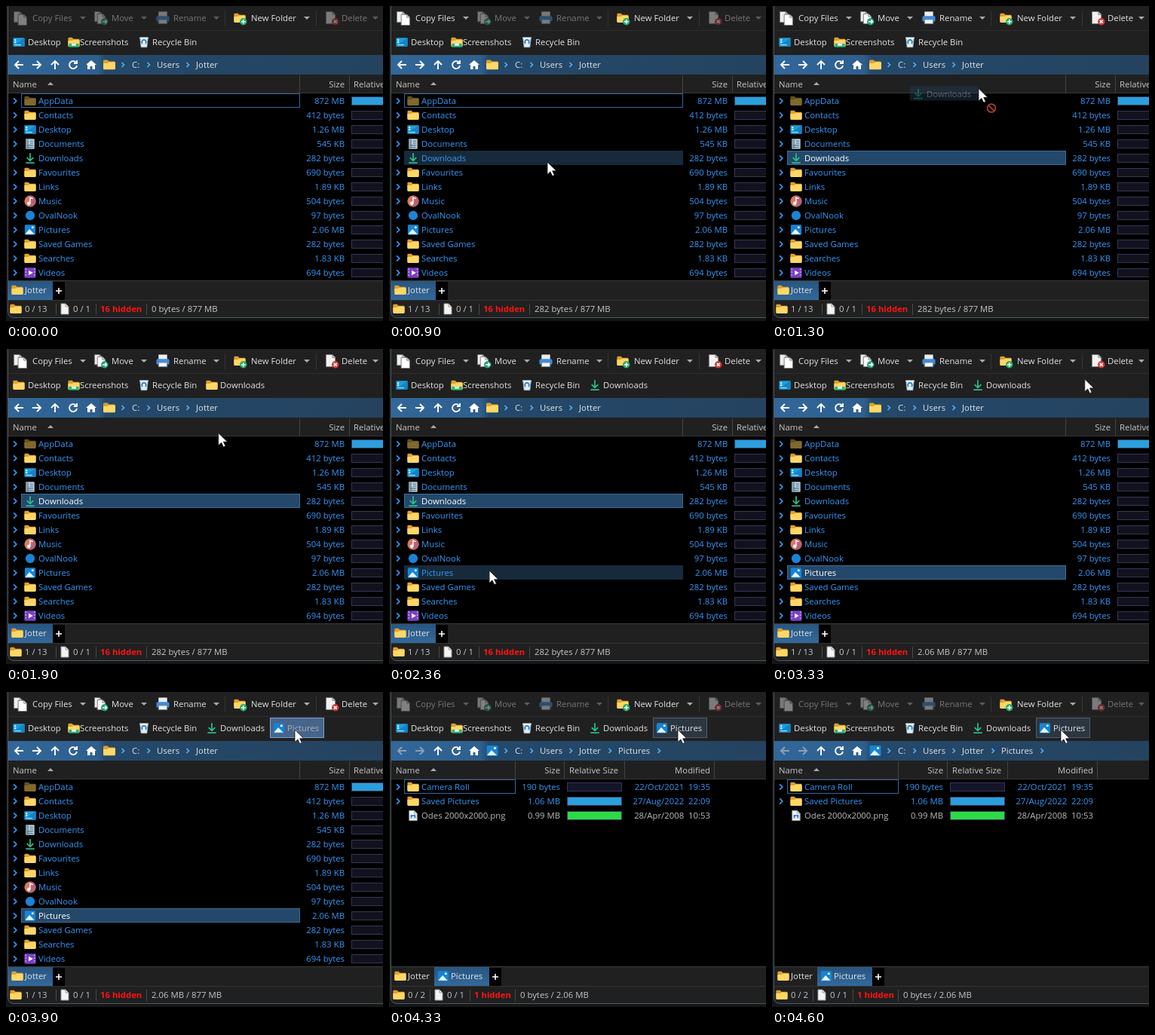
Write an HTML page that moves like this. It is 500 by 418 pixels and loops after 6300 ms.

```html
<!DOCTYPE html>
<html lang="en">
<head>
<meta charset="utf-8">
<title>File manager</title>
<style>
html, body { margin: 0; width: 100%; height: 100%; overflow: hidden; background: #141618; }
svg { display: block; width: 500px; height: 418px; }
text { font: 11.35px "Open Sans", "Noto Sans", sans-serif; white-space: pre; }
</style>
</head>
<body>
<svg id="stage" viewBox="0 0 500 418">
  <g id="scene"></g>
  <g id="ghost"></g>
  <g id="noDrop" fill="none" stroke="#a83c38" stroke-width="1.8"><circle r="5.4"/><path d="M-3.8 -3.8L3.8 3.8"/></g>
  <path id="cursor" d="M0 0V16.5L3.9 12.9L6.7 18.6L9.4 17.4L6.7 11.8H12Z" fill="#fff" stroke="#111" stroke-width=".8"/>
</svg>
<script>
(() => {
const LOOP = 6300, USER = 'Jotter';
const BLUE = '#3797f5', LIGHT = '#e2e2e2', SOFT = '#c6c6c6';
const $ = id => document.getElementById(id);

const at = (x, y, s) => `<g transform="translate(${x} ${y})">${s}</g>`;
const rect = (x, y, w, h, fill, more = '') => `<rect x="${x}" y="${y}" width="${w}" height="${h}" fill="${fill}" ${more}/>`;
const path = (d, fill, more = '') => `<path d="${d}" fill="${fill}" ${more}/>`;
const line = (d, color, w = 1) => path(d, 'none', `stroke="${color}" stroke-width="${w}"`);
const disc = (x, y, r, fill) => `<circle cx="${x}" cy="${y}" r="${r}" fill="${fill}"/>`;
// Text is placed by the middle of its line.
const text = (x, y, s, fill = LIGHT, anchor = 'start', more = '') =>
  `<text x="${x}" y="${y + 4}" fill="${fill}" text-anchor="${anchor}" ${more}>${s}</text>`;
const chevron = (x, y, color = BLUE, r = 3.6) => line(`M${x - r / 2} ${y - r}L${x + r / 2} ${y}L${x - r / 2} ${y + r}`, color, 1.7);
const dropArrow = (x, color) => path(`M${x - 4} 14H${x + 4}L${x} 18Z`, color);
const border = color => `stroke="${color}"`;

// Icons are drawn around their own middle.
const folderShape = (back, front) =>
  path('M-8 -5Q-8 -6.5 -6.5 -6.5H-2.5L-.5 -4.5H6.5Q8 -4.5 8 -3V5H-8Z', back) +
  path('M-8 -2H-2.5L-.5 -3.4H6.8Q8 -3.4 8 -2.2V5Q8 6.3 6.7 6.3H-6.7Q-8 6.3 -8 5Z', front);
const page = (x, y, w, h, fill, edge) =>
  path(`M${x} ${y}H${x + w - 4}L${x + w} ${y + 4}V${y + h}H${x}Z`, fill, border(edge)) +
  line(`M${x + w - 4} ${y}V${y + 4}H${x + w}`, edge);
const badge = (fill, sign) => disc(5, 5, 5, fill) + line(sign, '#fff', 1.7);
const icons = {
  folder: folderShape('#e0a02c', '#ffd766'),
  hidden: folderShape('#66501c', '#80692f'),
  shots: folderShape('#e0a02c', '#ffd766') + rect(-7, 2, 14, 5, '#2bb573') + rect(-3, 2, 6, 3, '#e9f7ff'),
  desktop: rect(-8, -6, 16, 12, '#1c9fdc', 'rx="1"') + path('M-8 5L8 -6V5Q8 6 7 6H-7Z', '#1583c4') +
    rect(-6, -4, 2, 2, '#fff') + rect(-6, -1, 2, 2, '#fff') + rect(-6, 3, 9, 1.5, '#8ee0f7'),
  docs: rect(-6, -7, 12, 14, '#b9cad6', 'rx="1"') + rect(-6, -7, 4, 14, '#7f9bae') +
    line('M0 -4H4M0 -1H4M-4 2H4M-4 5H4', '#47718e', 1.2),
  down: line('M0 -7V3M-4.5 -1L0 3.5L4.5 -1', '#2cc08a', 1.8) + line('M-6 6.5H6', '#2cc08a', 1.8),
  music: disc(0, 0, 8, '#d9795f') + path('M0 -8A8 8 0 0 1 0 8Z', '#b9607d') +
    line('M0 3V-5L4 -3.5', '#fff', 1.5) + disc(-1.8, 3, 2.4, '#fff'),
  cloud: disc(0, 0, 6.5, '#1b83d6'),
  pictures: rect(-7.5, -7, 15, 14, '#1684d4', 'rx="1.5"') + path('M-7 6L-1 -1L6 6Z', '#e8f6ff') + disc(3.5, -3.5, 1.6, '#fff'),
  videos: rect(-8, -7, 16, 14, '#7b3fc4', 'rx="1.5"') + path('M-2 -3.5L4 0L-2 3.5Z', '#fff') +
    path('M-6 -6V6M6 -6V6', 'none', 'stroke="#c7a4ee" stroke-width="1.5" stroke-dasharray="2"'),
  bin: path('M-5.5 -6H5.5L4 7H-4Z', '#e4edf2', border('#9fb2bd')) + line('M-2 2A3 3 0 1 1 2 2', '#1b82d1', 1.8) + line('M-6 -6H6', '#fff', 1.5),
  file: page(-5, -7, 10, 14, '#f4f4f4', '#999'),
  image: page(-5.5, -7, 11, 14, '#f4f4f4', '#999') + rect(-3.5, -1, 7, 5, '#2a86cf') + path('M-3 4L0 0L3 4Z', '#d9f0ff'),
  copy: page(-9, -9, 12, 15, '#eee', '#777') + page(-3, -5, 12, 15, '#fff', '#777'),
  move: page(-9, -9, 11, 14, '#eee', '#777') + page(-5, -6, 11, 14, '#fff', '#777') + badge('#1fa572', 'M2 5H8M5.5 2.5L8 5L5.5 7.5'),
  rename: rect(-6, -9, 12, 7, '#e9edf2') + rect(-9, -3, 18, 8, '#3e8bdc', 'rx="2"') + rect(-6, 2, 12, 6, '#f4f4f4', border('#66809c')),
  create: folderShape('#e0a02c', '#ffd766') + badge('#25ad69', 'M2 5H8M5 2V8'),
  remove: page(-8, -9, 13, 17, '#f2f2f2', '#777') + badge('#d93636', 'M3 3L7 7M7 3L3 7')
};
const icon = (name, x, y, scale = 1) => `<g transform="translate(${x} ${y}) scale(${scale})">${icons[name]}</g>`;

const home = [
  ['AppData', '872 MB', 'hidden'], ['Contacts', '412 bytes', 'folder'], ['Desktop', '1.26 MB', 'desktop'],
  ['Documents', '545 KB', 'docs'], ['Downloads', '282 bytes', 'down'], ['Favourites', '690 bytes', 'folder'],
  ['Links', '1.89 KB', 'folder'], ['Music', '504 bytes', 'music'], ['OvalNook', '97 bytes', 'cloud'],
  ['Pictures', '2.06 MB', 'pictures'], ['Saved Games', '282 bytes', 'folder'],
  ['Searches', '1.83 KB', 'folder'], ['Videos', '694 bytes', 'videos']
];
const album = [
  ['Camera Roll', '190 bytes', 'folder', '22/Oct/2021  19:35', '#15152a'],
  ['Saved Pictures', '1.06 MB', 'folder', '27/Aug/2022  22:09', '#2a9fdc'],
  ['Odes 2000x2000.png', '0.99 MB', 'image', '28/Apr/2008  10:53', '#2bdb46']
];
const rowY = i => 126 + 19 * i;

// [time, x, y] of the pointer tip
const track = [
  [100, 482, 247], [260, 346, 234], [430, 346, 234], [600, 210, 207], [960, 210, 207],
  [1530, 317, 44], [1730, 317, 44], [1900, 282, 111], [2360, 133, 294], [2630, 133, 294],
  [2900, 393, 78], [3130, 415, 40], [3330, 415, 40], [3500, 383, 50], [LOOP, 383, 50]
];
function pointer(t) {
  const i = Math.max(1, track.findIndex(k => k[0] >= t));
  const [a, b] = [track[i - 1], track[i]];
  const f = Math.max(0, (t - a[0]) / (b[0] - a[0]));
  return [a[1] + (b[1] - a[1]) * f, a[2] + (b[2] - a[2]) * f];
}
const within = (t, a, b) => t >= a && t < b;

function stateAt(t) {
  const [x, y] = pointer(t);
  const opened = t >= 4160;
  const drag = within(t, 990, 1560) ? 4 : within(t, 2660, 3330) ? 9 : -1;
  const selected = opened || t < 960 ? -1 : t < 2630 ? 4 : 9;
  const free = within(t, 430, 960) || within(t, 1730, 2630);
  const hover = free && y > 116 && x < 389 ? Math.floor((y - 116.5) / 19) : -1;
  return { x, y, opened, drag, selected, hover, counted: t >= 900 && !opened,
    active: t >= 960 && !opened, copyOn: t >= 900 && !opened,
    rebuilding: within(t, 1730, 1930), links: t < 1730 ? 0 : t < 3400 ? 1 : 2,
    button: t < 3470 ? '' : within(t, 3900, 4130) ? 'down' : 'hover' };
}

function drawTools(s) {
  const tool = (name, label, x, ix, arrow, on) =>
    `<g opacity="${on ? 1 : .43}">${icon(name, ix, 16, .95)}</g>` +
    text(x, 16, label, on ? LIGHT : '#777') + dropArrow(arrow, on ? '#aaa' : '#5c5c5c');
  return tool('copy', 'Copy Files', 35, 19, 102, s.copyOn) + tool('move', 'Move', 140, 126, 183, s.active) +
    tool('rename', 'Rename', 222, 208, 279, s.active) + tool('create', 'New Folder', 325, 310, 399, true) +
    tool('remove', 'Delete', 445, 432, 490, s.active) + line('M290.5 6V27M411.5 6V27', '#343434');
}

function drawLinks(s) {
  const link = (name, label, ix, x, color) => icon(name, ix, 48, .95) + text(x, 48, label, color);
  let out = link(s.rebuilding ? 'folder' : 'desktop', 'Desktop', 17, 29) + link('shots', 'Screenshots', 90, 98) + link('bin', 'Recycle Bin', 183, 194);
  if (s.links > 0) out += link(s.rebuilding ? 'folder' : 'down', 'Downloads', 273, 284);
  if (s.links > 1) {
    const down = s.button === 'down';
    if (s.button) out += rect(350.5, 34.5, 71, 26, down ? '#47648a' : '#2c3640', border(down ? '#7ba3d0' : '#4d5f70'));
    out += link('pictures', 'Pictures', 362, 373, down ? '#a9b1ba' : LIGHT);
  }
  return out;
}

function drawPath(s) {
  const arrow = (x, d, off) => at(x, 78, line(d, off ? '#8da0b1' : '#fff', 1.9));
  const left = 'M6 0H-5M0 -5L-5 0L0 5', right = 'M-6 0H5M0 -5L5 0L0 5';
  let out = rect(3, 65, 497, 26, 'url(#bar)') +
    arrow(17, left, s.opened) + arrow(41, right, s.opened) + arrow(65, 'M0 6V-5M-5 0L0 -5L5 0') +
    arrow(89, 'M4 -3A5 5 0 1 0 5 1M5 -6V-2H1') +
    at(113, 78, path('M-7 0L0 -6L7 0H5V6H1.5V2H-1.5V6H-5V0Z', '#fff')) +
    icon(s.opened ? 'pictures' : 'folder', 137, 78);
  const crumbs = [['C:', 167, 155], ['Users', 200, 189], [USER, 252, 241]];
  if (s.opened) crumbs.push(['Pictures', 304, 293]);
  for (const [label, x, c] of crumbs) out += chevron(c, 78, '#55aef5', 3) + text(x, 78, label);
  return s.opened ? out + chevron(358, 78, '#55aef5', 3) : out;
}

function drawHeader(s) {
  const bars = s.opened ? [167, 232, 312, 431] : [389, 455];
  return rect(3, 91, 497, 25, '#202020') + text(9, 104, 'Name', SOFT) + path('M55 105L59 101L63 105Z', '#aaa') +
    text(s.opened ? 227 : 449, 104, 'Size', SOFT, 'end') + text(s.opened ? 239 : 461, 104, 'Relative Size', SOFT) +
    (s.opened ? text(426, 104, 'Modified', SOFT, 'end') : '') +
    bars.map(x => line(`M${x + .5} 92V115`, '#444')).join('') + line('M3 115.5H500', '#353535');
}

function drawList(s) {
  const rows = s.opened ? album : home;
  const nameEnd = s.opened ? 167 : 389;
  let out = rect(3, 116, 497, 248, '#000');
  rows.forEach(([name, size, kind, date, fill], i) => {
    const y = rowY(i), chosen = i === s.selected;
    const color = kind === 'image' ? '#bdbdbd' : BLUE;
    const box = (bg, edge) => rect(20.5, y - 9.5, nameEnd - 20, 18, bg, border(edge));
    if (chosen) out += box('#24486a', '#3c6c97');
    else if (i === s.hover) out += box('#172a3b', '#172a3b');
    if (i === 0 && (s.opened || s.selected < 0)) out += box('none', '#38659a');
    if (kind !== 'image') out += chevron(12, y);
    out += icon(kind, 32, y, .95) + text(43, y, name, chosen ? '#fff' : color) +
      text(s.opened ? 227 : 449, y, size, color, 'end') +
      rect(s.opened ? 236.5 : 458.5, y - 5.5, 72, 11, s.opened ? fill : i ? '#12121f' : '#2a9fdc', border('#36365a'));
    if (date) out += text(426, y, date, color, 'end');
  });
  return out;
}

function drawTabs(s) {
  const tab = (x, w, name, label, on) =>
    (on ? rect(x, 365, w, 25, 'url(#tab)') : '') + icon(name, x + 12, 377, .95) + text(x + 22, 377, label);
  const end = s.opened ? 133 : 62;
  return line('M3 364.5H500', '#3a3a3a') + tab(3, s.opened ? 57 : 59, 'folder', USER, !s.opened) +
    (s.opened ? tab(60, 73, 'pictures', 'Pictures', true) : '') +
    rect(end, 366, 16, 24, '#000') + line(`M${end + 4} 378H${end + 12}M${end + 8} 374V382`, '#fff', 1.6);
}

function drawStatus(s) {
  const d = s.opened ? 0 : 12, e = s.opened ? 0 : 19;
  const n = s.counted ? 1 : 0;
  const bytes = !s.counted ? '0 bytes' : s.selected === 9 ? '2.06 MB' : '282 bytes';
  const bar = x => line(`M${x + .5} 395V410`, '#4a4a4a');
  return line('M3 390.5H500', '#343434') + icon('folder', 13, 402, .95) +
    text(25, 402, `${n} / ${s.opened ? 2 : 13}`, SOFT) + bar(54 + d) + icon('file', 66 + d, 402) +
    text(77 + d, 402, '0 / 1', SOFT) + bar(107 + d) +
    text(113 + d, 402, `${s.opened ? 1 : 16} hidden`, '#ff1414', 'start', 'style="font-weight:700"') + bar(167 + e) +
    text(174 + e, 402, `${bytes} / ${s.opened ? '2.06' : '877'} MB`, SOFT);
}

const gradient = (id, dir, stops) => `<linearGradient id="${id}" ${dir}>` +
  stops.map(([o, c]) => `<stop offset="${o}" stop-color="${c}"/>`).join('') + '</linearGradient>';
const defs = '<defs>' + gradient('bar', '', [[0, '#326799'], [.24, '#2d5f8e'], [.26, '#24496b'], [1, '#25435f']]) +
  gradient('tab', 'x2="0" y2="1"', [[0, '#28557f'], [1, '#33699b']]) + '</defs>';
const frame = 'M2.5 -2V405Q2.5 413.5 11 413.5H502V-2Z';

function drawScene(s) {
  return defs + path(frame, '#202020') + drawTools(s) + line('M3 32.5H500', '#2e2e2e') + drawLinks(s) +
    drawPath(s) + drawHeader(s) + drawList(s) + drawTabs(s) + drawStatus(s) + line(frame, '#4f5a63');
}

function drawGhost(i) {
  if (i < 0) return '';
  const [name, , kind] = home[i];
  const w = i === 4 ? 91 : 73;
  return `<g opacity="0.45">${rect(-w, -3, w, 19, '#203c56')}${icon(kind, 11 - w, 7, .95)}${text(22 - w, 7, name, '#c6d0d9')}</g>`;
}

const drawn = {};
function put(id, markup) {
  if (drawn[id] !== markup) $(id).innerHTML = drawn[id] = markup;
}
function place(id, x, y, shown) {
  $(id).setAttribute('transform', `translate(${x.toFixed(1)} ${y.toFixed(1)})`);
  $(id).style.display = shown ? '' : 'none';
}

function render(t) {
  const s = stateAt(t);
  put('scene', drawScene(s));
  put('ghost', drawGhost(s.drag));
  place('ghost', s.x, s.y, s.drag >= 0);
  place('noDrop', s.x + 17, s.y + 26, s.drag >= 0 && s.y > 64);
  place('cursor', s.x, s.y, t >= 100);
}

const start = performance.now();
function tick() {
  render((performance.now() - start) % LOOP);
  requestAnimationFrame(tick);
}
tick();
})();
</script>
</body>
</html>
```
